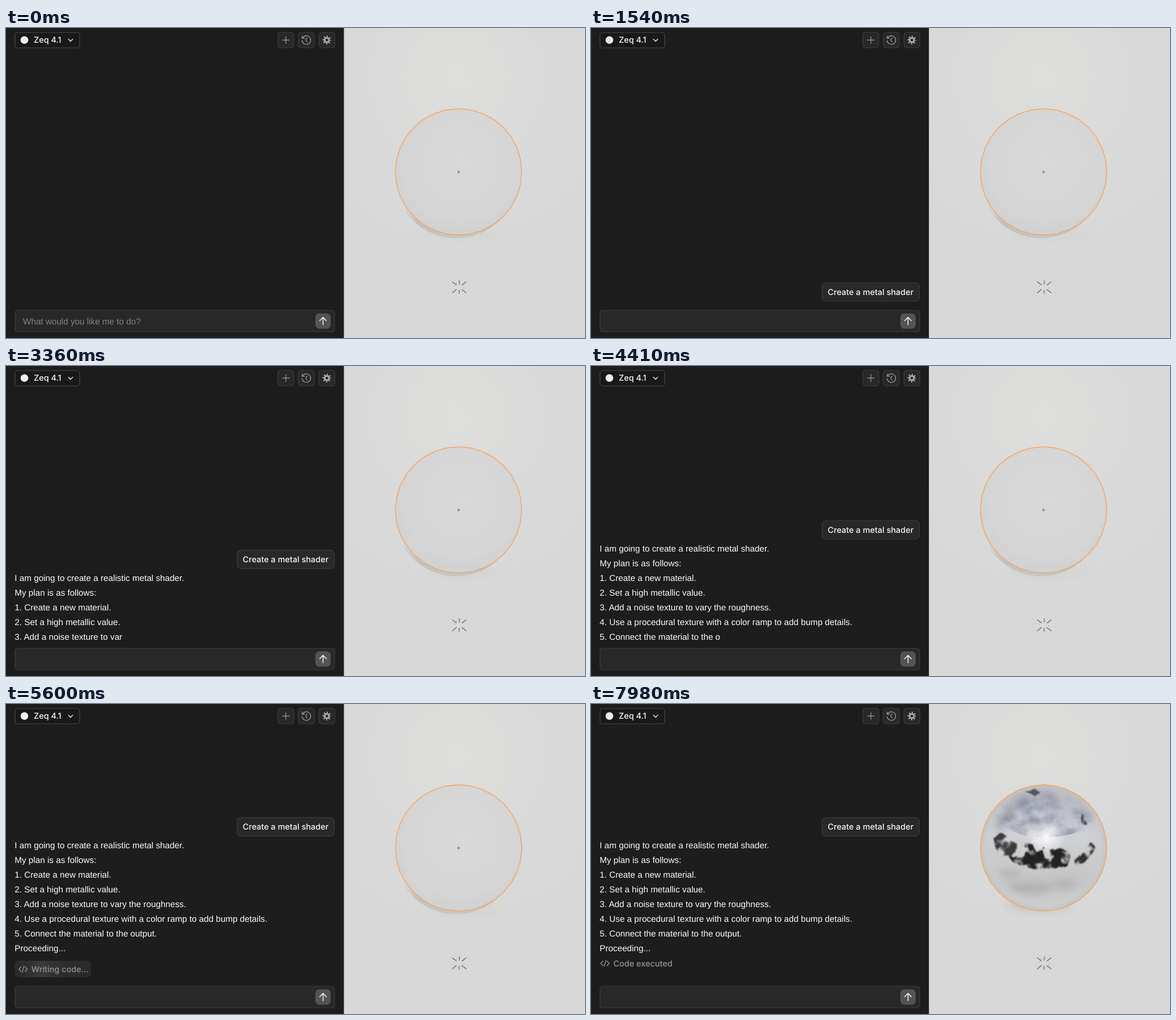
An HTML page for the animation above (8 s loop, 1022x548 px).

```html
<!DOCTYPE html>
<html lang="en">
<head>
<meta charset="utf-8">
<title>Shader assistant</title>
<style>
  html, body { margin: 0; width: 100%; height: 100%; overflow: hidden; background: #1d1d1d; }
  svg { display: block; width: 100vw; height: 100vh; }
  text { white-space: pre; text-rendering: geometricPrecision; }
  .body { font: 15.26px "Liberation Sans", Arial, sans-serif; fill: #fafafa; }
  .ui { font: 500 14.45px Inter, sans-serif; fill: #f6f6f6; }
  .muted { fill: #949494; }
  .box { fill: #282828; stroke: #3d3d3d; stroke-width: 1.2; }
  .line { fill: none; stroke-linecap: round; stroke-linejoin: round; stroke-width: 1.4; }
</style>
</head>
<body>
<svg viewBox="0 0 1022 548" preserveAspectRatio="none">
  <defs>
    <radialGradient id="floor" gradientUnits="userSpaceOnUse" cx="795" cy="90" r="330">
      <stop offset="0" stop-color="#dededc"/><stop offset=".5" stop-color="#dadada"/><stop offset="1" stop-color="#d8d8d8"/>
    </radialGradient>
    <radialGradient id="clay" cx=".52" cy=".42" r=".6">
      <stop offset="0" stop-color="#d9d9d9"/><stop offset=".75" stop-color="#d6d6d6"/><stop offset="1" stop-color="#d0d0d0"/>
    </radialGradient>
    <linearGradient id="shade" gradientUnits="userSpaceOnUse" x1="0" y1="316" x2="0" y2="373">
      <stop offset="0" stop-color="#c2c2c2" stop-opacity="0"/><stop offset=".5" stop-color="#c0c0c0"/><stop offset="1" stop-color="#c6c6c6"/>
    </linearGradient>
    <linearGradient id="chrome" x1="0" y1="0" x2="0" y2="1">
      <stop offset="0" stop-color="#a9abb2"/><stop offset=".2" stop-color="#bcbfc8"/><stop offset=".4" stop-color="#cfd0d5"/>
      <stop offset=".64" stop-color="#c9c9ca"/><stop offset=".8" stop-color="#c4c4c4"/><stop offset="1" stop-color="#d0d0d0"/>
    </linearGradient>
    <radialGradient id="rim">
      <stop offset=".78" stop-color="#cbcbcb" stop-opacity="0"/><stop offset=".92" stop-color="#cbcbcb" stop-opacity=".6"/><stop offset="1" stop-color="#c3c3c3"/>
    </radialGradient>
    <radialGradient id="glow">
      <stop offset="0" stop-color="#fff" stop-opacity=".95"/><stop offset="1" stop-color="#fff" stop-opacity="0"/>
    </radialGradient>
    <linearGradient id="sheen">
      <stop offset="0" stop-color="#fff" stop-opacity="0"/><stop offset=".5" stop-color="#fff" stop-opacity=".07"/><stop offset="1" stop-color="#fff" stop-opacity="0"/>
    </linearGradient>
    <filter id="ragged" x="-10%" y="-20%" width="120%" height="140%" color-interpolation-filters="sRGB">
      <feTurbulence type="fractalNoise" baseFrequency=".06" numOctaves="3" seed="4" result="noise"/>
      <feColorMatrix values="0 0 0 0 0  0 0 0 0 0  0 0 0 0 0  0 0 5 0 -1.5" result="holes"/>
      <feDisplacementMap in="SourceGraphic" in2="noise" scale="10" xChannelSelector="R" yChannelSelector="G"/>
      <feComposite in2="holes" operator="in"/>
      <feGaussianBlur stdDeviation="1"/>
    </filter>
    <filter id="mottle" color-interpolation-filters="sRGB">
      <feTurbulence type="fractalNoise" baseFrequency=".028 .04" numOctaves="4" seed="9"/>
      <feColorMatrix values="0 0 0 0 .56  0 0 0 0 .58  0 0 0 0 .65  2.4 0 0 0 -.85" result="spots"/>
      <feGaussianBlur in="SourceGraphic" stdDeviation="8"/>
      <feComposite in="spots" operator="in"/>
      <feComposite in="spots" in2="SourceGraphic" operator="in"/>
    </filter>
    <filter id="soft" x="-50%" y="-50%" width="200%" height="200%"><feGaussianBlur stdDeviation="7"/></filter>
    <clipPath id="ball"><circle cx="798.8" cy="254.4" r="111"/></clipPath>
    <clipPath id="pillShape"><rect x="15.5" y="454" width="134.5" height="29" rx="7"/></clipPath>
    <path id="codeIcon" class="line" stroke="#949494" d="M4.5 -4 L.7 0 L4.5 4 M11.8 -4 L15.6 0 L11.8 4 M9.8 -5.6 L6.5 5.6"/>
  </defs>

  <rect width="1022" height="548" fill="#1d1d1d"/>

  <!-- chat -->
  <g id="bubble">
    <rect class="box" x="408" y="450.5" width="171.5" height="32.5" rx="7"/>
    <text class="ui" x="417.8" y="471.8">Create a metal shader</text>
  </g>
  <g id="reply" class="body"></g>
  <g id="pill">
    <rect x="15.5" y="454" width="134.5" height="29" rx="7" fill="#2b2b2b"/>
    <g clip-path="url(#pillShape)"><path id="band" d="M-35 483 L-21 454 H49 L35 483 Z" fill="url(#sheen)"/></g>
    <use href="#codeIcon" x="22" y="468.7"/>
    <text class="ui muted" x="44.8" y="473.7">Writing code...</text>
  </g>
  <g id="done">
    <use href="#codeIcon" x="16.5" y="458.5"/>
    <text class="ui muted" x="39.5" y="463.5">Code executed</text>
  </g>

  <!-- prompt field -->
  <rect class="box" x="16" y="499" width="564" height="38" rx="5"/>
  <text id="hint" class="body" x="30" y="523.6" style="fill:#838383">What would you like me to do?</text>
  <text id="prompt" class="body" x="30" y="523.6"></text>
  <rect id="caret" y="512" width="1.5" height="15" fill="#e0e0e0"/>
  <rect x="546" y="504.5" width="27" height="27" rx="7" fill="#545454"/>
  <path class="line" stroke="#fff" d="M559.6 524.6 V511.8 M553.8 517.4 L559.6 511.6 L565.4 517.4"/>

  <!-- header -->
  <rect x="16" y="8" width="114" height="27" rx="4.5" fill="#191919" stroke="#484848" stroke-width="1.2"/>
  <circle cx="32.5" cy="21.2" r="6.8" fill="#f0f0f0"/>
  <text class="ui" x="49" y="26.4">Zeq 4.1</text>
  <path class="line" stroke="#eee" d="M110.3 19.8 L114 23.5 L117.7 19.8"/>
  <g class="box">
    <rect x="480" y="7.5" width="28" height="27.5" rx="5"/>
    <rect x="516" y="7.5" width="28" height="27.5" rx="5"/>
    <rect x="552.5" y="7.5" width="28" height="27.5" rx="5"/>
  </g>
  <g class="line" stroke="#a0a0a0" style="stroke-width:1.2">
    <path d="M488 21.3 H500 M494 15.3 V27.3"/>
    <path d="M523.4 17.8 A7.6 7.6 0 1 1 522.6 22.4 M522.8 14 V18.2 H527 M531.4 17.6 L529 21.4 L531.6 25"/>
  </g>
  <g fill="none" stroke="#a8a8a8">
    <circle cx="566.3" cy="21.3" r="3.9" stroke-width="3"/>
    <circle cx="566.3" cy="21.3" r="6.4" stroke-width="2.6" stroke-dasharray="2.2 2.827" stroke-dashoffset="1.1"/>
  </g>

  <!-- viewport -->
  <rect x="596.5" width="425.5" height="548" fill="url(#floor)"/>
  <g id="clayBall">
    <ellipse cx="810" cy="366" rx="70" ry="12" fill="#d2d2ce" opacity=".5" filter="url(#soft)"/>
    <circle cx="794.5" cy="262.5" r="109" fill="url(#shade)"/>
    <circle cx="798.8" cy="254.4" r="111" fill="url(#clay)"/>
  </g>
  <g id="metalBall">
    <ellipse cx="790" cy="356" rx="60" ry="11" fill="#c6c6c6" filter="url(#soft)"/>
    <g clip-path="url(#ball)">
      <circle cx="798.8" cy="254.4" r="111" fill="url(#chrome)"/>
      <ellipse cx="803" cy="188" rx="92" ry="48" filter="url(#mottle)"/>
      <path d="M719 222 Q728 176 772 155" fill="none" stroke="#8a8d95" stroke-width="12" opacity=".6" filter="url(#soft)"/>
      <g fill="#b0b0b0" filter="url(#soft)">
        <ellipse cx="775" cy="325" rx="38" ry="10"/><ellipse cx="835" cy="318" rx="22" ry="7"/>
        <ellipse cx="740" cy="300" rx="20" ry="6"/>
      </g>
      <circle cx="798.8" cy="254.4" r="111" fill="url(#rim)"/>
      <ellipse cx="803" cy="234" rx="36" ry="32" fill="url(#glow)"/>
      <g fill="#222" filter="url(#ragged)">
        <path fill="#3c3c3c" d="M711 236 L722 230 L737 235 L751 246 L753 257 L738 270 L722 265 L712 253 Z"/>
        <path d="M736 268 L764 268 L771 259 L765 247 L779 249 L786 262 L797 258 L801 272 L811 274 L809 257 L825 254 L842 261 L846 275 L838 288 L800 291 L768 289 L748 281 Z"/>
        <path fill="#303030" d="M854 277 L866 266 L877 261 L883 241 L888 254 L881 270 L869 281 L857 285 Z"/>
        <path fill="#55565e" d="M764 156 L780 150 L795 154 L786 162 Z"/>
        <path fill="#404044" d="M864 196 L872 198 L874 212 L867 211 Z"/>
      </g>
    </g>
  </g>
  <path id="outline" fill="none" stroke="#f6a55d" stroke-width="1.4"/>
  <circle cx="798.9" cy="254.6" r="1.6" fill="#ee9355" stroke="#85573a" stroke-width=".8"/>
  <g fill="none">
    <circle cx="800" cy="458" r="8.2" stroke="#f0eaea" stroke-width="1"/>
    <circle cx="800" cy="458" r="8.2" stroke="#d08a8e" stroke-width="1" stroke-dasharray="3.2 3.24"/>
    <path stroke="#626062" stroke-width="1.1" d="M787.5 448.5 L795.5 454.5 M812.5 448.5 L804.5 454.5 M787.5 468.5 L795.5 462 M812.5 468.5 L804.5 462 M800 446 V453.5 M800 463 V470"/>
  </g>
</svg>

<script>
const LOOP = 8000, TICK = 70, LINE = 26.08;
const PROMPT = "Create a metal shader";
const REPLY = [
  "I am going to create a realistic metal shader.",
  "My plan is as follows:",
  "1. Create a new material.",
  "2. Set a high metallic value.",
  "3. Add a noise texture to vary the roughness.",
  "4. Use a procedural texture with a color ramp to add bump details.",
  "5. Connect the material to the output.",
  "Proceeding..."
].join("\n");
const SWEEPS = [5460, 6300, 7280];

const el = id => document.getElementById(id);
const show = (id, on) => { el(id).style.display = on ? "" : "none"; };
const move = (id, x, y) => el(id).setAttribute("transform", `translate(${x} ${y})`);
const clamp = x => Math.min(1, Math.max(0, x));
const smooth = x => { x = clamp(x); return x * x * (3 - 2 * x); };

const rows = REPLY.split("\n").map((_, i) => {
  const row = document.createElementNS("http://www.w3.org/2000/svg", "text");
  row.setAttribute("x", 15.3);
  row.setAttribute("y", i * LINE);
  return el("reply").appendChild(row);
});

const corners = Array.from({ length: 32 }, (_, i) => {
  const a = i * Math.PI / 16;
  return `${798.8 + 111.6 * Math.sin(a)} ${254.4 - 111.6 * Math.cos(a)}`;
});
el("outline").setAttribute("d", `M${corners.join("L")}Z`);

function drawPrompt(t) {
  const typing = t >= 210 && t < 1330;
  show("hint", t < 210);
  show("prompt", typing);
  show("caret", typing);
  if (!typing) return;
  el("prompt").textContent = PROMPT.slice(0, Math.floor((t - 140) / 44));
  el("caret").setAttribute("x", 30.8 + el("prompt").getComputedTextLength());
}

function drawChat(t) {
  const step = Math.max(0, (t - 2030) / TICK + 1);
  const lines = step ? REPLY.slice(0, Math.floor(step * 7.75)).trimEnd().split("\n") : [];
  rows.forEach((row, i) => { row.textContent = lines[i] || ""; });

  // the chat rises to make room for the code pill
  const open = smooth((t - 4900) / 210);
  const lift = 46.5 * open;
  const firstLine = 484 - (lines.length - 1) * LINE - lift;
  move("reply", 0, firstLine);

  const enter = smooth((t - 1260) / 280);
  const bubbleY = lines.length ? firstLine - 504.5 : 16 * (1 - enter);
  move("bubble", 0, bubbleY);
  el("bubble").style.opacity = enter;

  move("pill", 0, 27.7 * (1 - open));
  el("pill").style.opacity = open ** 1.2;
  const start = SWEEPS.filter(s => s <= t).pop();
  const sweep = start ? clamp((t - start + TICK) / 420) : 0;
  move("band", -30 + 175 * sweep, 0);
}

function draw(time) {
  const t = Math.floor(time / TICK) * TICK;
  const finished = t >= 7980;
  drawPrompt(t);
  drawChat(t);
  show("pill", t >= 4970 && !finished);
  show("done", finished);
  show("clayBall", !finished);
  show("metalBall", finished);
}

const began = performance.now();
function tick() {
  draw((performance.now() - began) % LOOP);
  requestAnimationFrame(tick);
}
tick();
</script>
</body>
</html>
```
